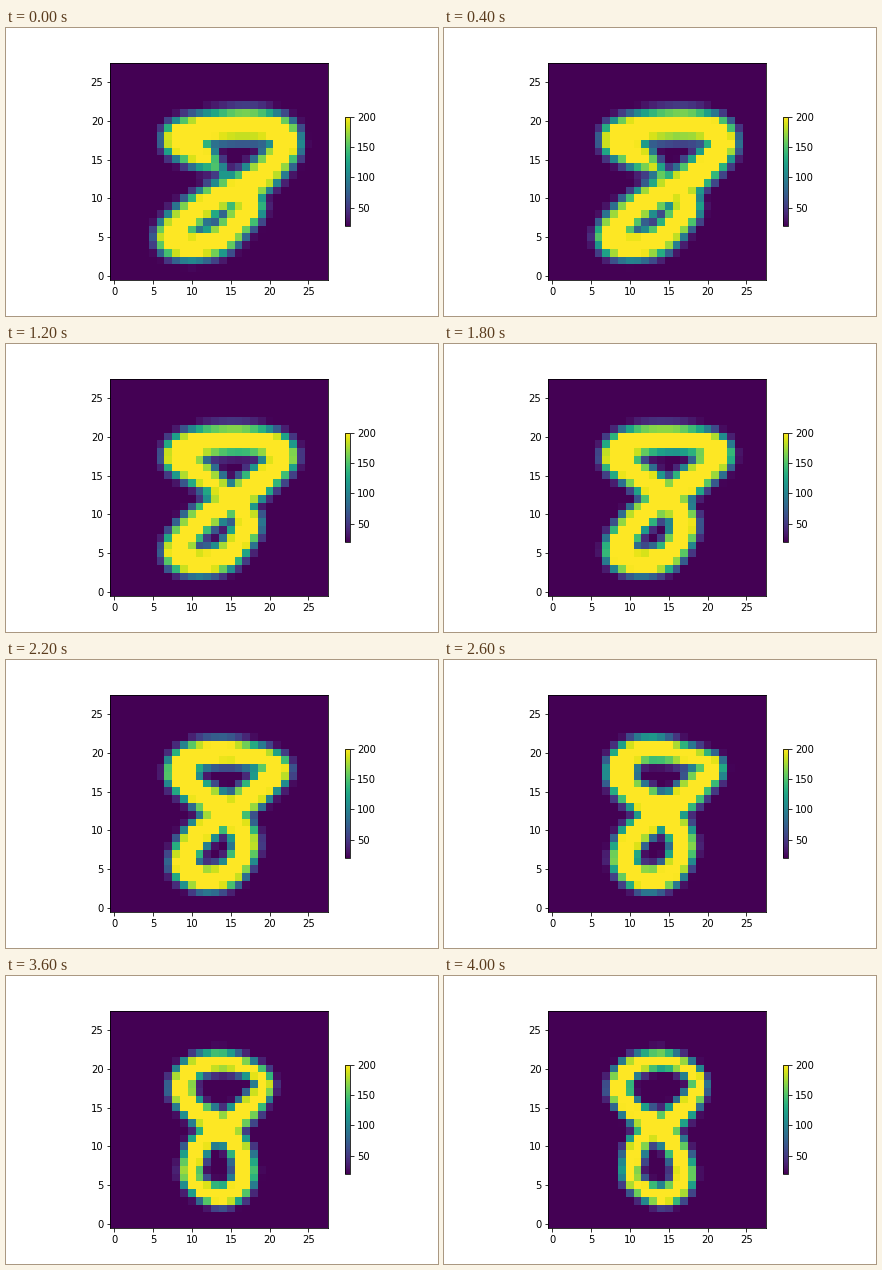
A matplotlib script that plays this animation: 432x288 px, repeating every 4200 ms.

```python
import numpy as np
import matplotlib.pyplot as plt
from matplotlib.animation import FuncAnimation

FRAMES, INTERVAL = 21, 200
SIZE = 28
LOW, HIGH = 20, 200

# A pose is a closed figure-eight stroke: x, y and half width of each knot.
SLANTED = [
    [8.3, 11.2, 17, 21, 22, 20.2, 17.4, 13, 9.6, 7.3, 9.8, 13.4, 16.1, 17.3, 14, 10.8],
    [17.6, 18.9, 19.4, 18.8, 16.8, 14.1, 11.8, 9.9, 7.7, 5, 3.9, 4.7, 7.2, 9.7, 13.4, 15.9],
    [1.9, 1.8, 1.9, 1.8, 1.8, 1.8, 1.9, 1.7, 1.7, 1.8, 1.7, 1.7, 1.7, 1.6, 0.2, 1.7],
]
LEANING = [
    [8.5, 10.3, 15.5, 20, 21.4, 19.2, 16, 12.3, 10, 8.7, 11, 14.5, 16.4, 16.8, 14, 10.2],
    [17.4, 19.2, 19.7, 19.1, 17.5, 15.3, 13, 10.4, 8.2, 5.2, 3.9, 4.5, 6.8, 9.4, 12.8, 15.6],
    [2, 1.8, 1.6, 1.6, 1.7, 1.7, 1.7, 1.6, 1.6, 1.8, 1.6, 1.6, 1.6, 1.6, 1.6, 1.7],
]
RISING = [
    [8.9, 10, 13.3, 18.2, 20.6, 18.7, 15.7, 11.8, 9.8, 9.4, 11.8, 14.8, 16.4, 16.6, 14, 10],
    [17.5, 19.7, 20.4, 19.4, 18, 15.8, 13.2, 10.5, 8.2, 5.6, 3.8, 4.3, 6.4, 9.2, 12.5, 15.1],
    [1.8, 1.6, 1.5, 1.2, 1.4, 1.6, 1.7, 1.6, 1.6, 1.5, 1.5, 1.5, 1.5, 1.5, 1.8, 1.6],
]
UPRIGHT = [
    [8.7, 10, 13.9, 17.3, 18.8, 17.5, 15, 11.7, 10.5, 10.4, 13.8, 16.2, 16.9, 16, 14, 10.6],
    [17.2, 20, 21.1, 20.1, 18, 15.4, 13.2, 11.1, 8.8, 5.6, 3.7, 4.6, 6.7, 9.6, 12.4, 14.4],
    [1.3, 1.2, 1.1, 0.9, 0.95, 1.2, 1.4, 1.2, 1.2, 1, 1.15, 1.3, 1.3, 1.25, 1.5, 1.2],
]
POSES = np.array([SLANTED, LEANING, RISING, UPRIGHT])
POSE_FRAMES = [0, 9, 13, 20]
SOFTNESS = [0.52, 0.45, 0.42, 0.38]

ROWS, COLS = np.mgrid[:SIZE, :SIZE]


def pose_at(frame):
    k = min(np.searchsorted(POSE_FRAMES, frame, side="right") - 1, len(POSES) - 2)
    start, stop = POSE_FRAMES[k], POSE_FRAMES[k + 1]
    t = (frame - start) / (stop - start)
    return (1 - t) * POSES[k] + t * POSES[k + 1]


def closed_spline(knots, steps=12):
    """Catmull-Rom curve through the knots, joined end to start."""
    t = np.linspace(0, 1, steps, endpoint=False)
    a, b, c, d = (np.roll(knots, s, axis=1)[..., None] for s in (1, 0, -1, -2))
    curve = b + 0.5 * t * (c - a + t * (2 * a - 5 * b + 4 * c - d
                                       + t * (3 * (b - c) + d - a)))
    return curve.reshape(len(knots), -1)


def digit(frame):
    x, y, radius = closed_spline(pose_at(frame))
    distance = np.hypot(COLS[..., None] - x, ROWS[..., None] - y)
    edge = (distance - radius).min(axis=-1)
    return 255 / (1 + np.exp(edge / np.interp(frame, POSE_FRAMES, SOFTNESS)))


fig, ax = plt.subplots(figsize=(6, 4), dpi=72)
fig.subplots_adjust(left=0.125, right=0.9, bottom=0.125, top=0.88)
image = ax.imshow(digit(0), origin="lower", cmap="viridis",
                  vmin=LOW, vmax=HIGH, interpolation="nearest")
ax.set_xticks(range(0, SIZE, 5))
ax.set_yticks(range(0, SIZE, 5))
fig.colorbar(image, ax=ax, shrink=0.5, ticks=[50, 100, 150, 200])


def update(frame):
    image.set_data(digit(frame))
    return [image]


anim = FuncAnimation(fig, update, frames=FRAMES, interval=INTERVAL,
                     repeat=True, repeat_delay=0)
plt.show()
```
